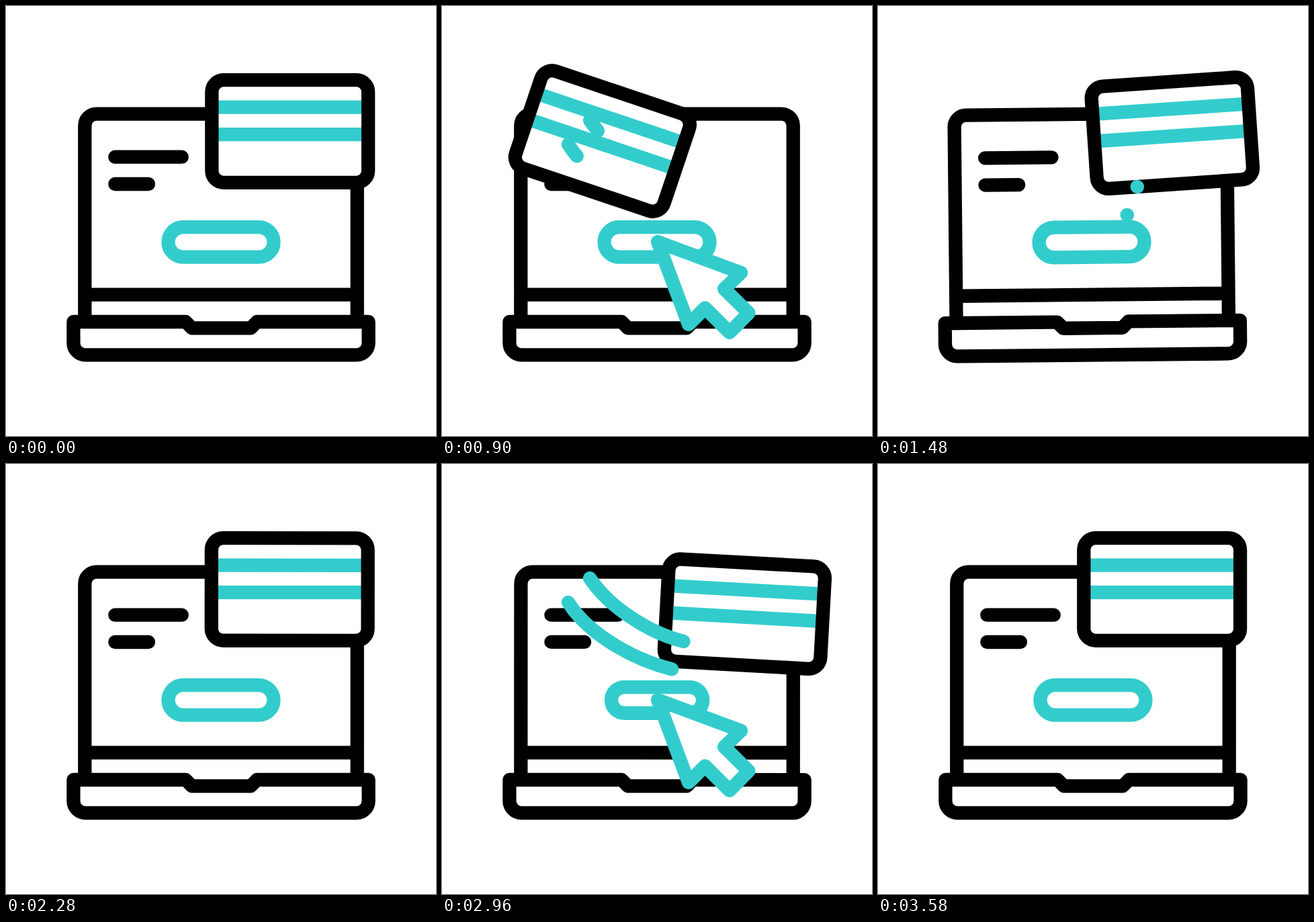
Write an HTML page that moves like this. It is 640 px wide and 640 px high and loops after 3600 ms.

```html
<!DOCTYPE html>
<html lang="en">
<head>
<meta charset="utf-8">
<title>Online payment</title>
<style>
  html, body { margin: 0; width: 100%; height: 100%; overflow: hidden; background: #fff; }
  svg { display: block; width: 100vw; height: 100vh; }
  svg * { stroke-linecap: round; stroke-linejoin: round; }
  .ink { fill: none; stroke: #000; stroke-width: 20.3; }
  .teal { fill: none; stroke: #33cccc; stroke-width: 20.3; }
  .paper { fill: #fff; }
  .stripe { stroke-linecap: butt; }
</style>
</head>
<body>
<svg viewBox="0 0 640 640">
  <g id="laptop">
    <path class="ink" d="M117.3 470V178a17.3 17.3 0 0 1 17.3-17.3H505.4a17.3 17.3 0 0 1 17.3 17.3V470M117.3 429.7H522.7"/>
    <path class="ink" d="M162.3 224.7H261.7M162.3 265H212"/>
    <path class="ink paper" d="M100.4 470H267.5L276.5 479.3H364.5L373.5 470H539.6V501.4a18 18 0 0 1-18 18H118.4a18 18 0 0 1-18-18Z"/>
    <g transform="translate(320 351.4)">
      <rect id="button" class="teal"/>
    </g>
  </g>
  <g id="card">
    <rect class="paper" x="-116" y="-76" width="232" height="152" rx="17"/>
    <path class="teal stripe" d="M-114-35.8H114M-114 4.6H114"/>
    <rect class="ink" x="-116.4" y="-76.3" width="232.8" height="152.6" rx="17.5"/>
  </g>
  <path class="teal trail" pathLength="100" d="M220 170C250 215 320 262 386 269"/>
  <path class="teal trail" pathLength="100" d="M188 206C215 250 290 300 371 311"/>
  <path id="cursor" class="teal paper" d="M321 351L445 397L420 421L456.500 457L428 486L391.500 449.500L367 474Z"/>
</svg>
<script>
const LOOP = 3600;
const $ = id => document.getElementById(id);
const trails = document.querySelectorAll('.trail');

// Progress from 0 to 1 between two times.
const span = (t, from, to) => Math.min(1, Math.max(0, (t - from) / (to - from)));

function ease(t, from, to, power = 2) {
  const u = span(t, from, to);
  return u < 0.5 ? (2 * u) ** power / 2 : 1 - (2 - 2 * u) ** power / 2;
}

// The card winds up, swings past its place until `hit`, then settles by `rest`.
const swing = (t, away, past, hit, rest) =>
  away * ease(t, 398, 775, 3)
  + (past - away) * ease(t, 861, hit)
  - past * ease(t, hit, rest);

// The blow of the card rocks the laptop once, fading out.
function rock(t) {
  const u = span(t, 1110, 1575);
  return 1.35 * Math.sin(2 * Math.PI * u) * Math.sqrt(1 - u);
}

function drawCard(t) {
  const x = 422.7 + swing(t, -192, 42, 1164, 1715);
  const y = 186.5 + swing(t, 13, 36.8, 1090, 1570);
  const turn = swing(t, 19, -5.9, 1297, 1740);
  $('card').setAttribute('transform', `translate(${x} ${y}) rotate(${turn})`);
  $('laptop').setAttribute('transform', `rotate(${rock(t)} 320 540)`);
}

function drawTrails(t) {
  const head = 100 * (1 - (1 - span(t, 885, 1350)) ** 3);
  const tail = 100 * ease(t, 1190, 1490);
  for (const trail of trails) {
    trail.style.display = head <= 0 || tail >= 100 ? 'none' : '';
    trail.setAttribute('stroke-dasharray', `${Math.max(head - tail, 0.1)} 300`);
    trail.setAttribute('stroke-dashoffset', -tail);
  }
}

function drawClick(t) {
  const away = 1.3 * (1 - ease(t, 60, 460) + ease(t, 914, 1314));
  $('cursor').setAttribute('transform', `translate(${171 * away} ${278 * away})`);

  const size = 1 - 0.133 * Math.sin(Math.PI * span(t, 680, 890));
  const width = 157 * size, height = 44.6 * size;
  const box = { x: -width / 2, y: -height / 2, width, height, rx: height / 2 };
  for (const name in box) $('button').setAttribute(name, box[name]);
}

// The scene plays twice per loop; the second click comes a little later.
function draw(t) {
  const again = t >= 2000;
  const cardTime = again ? t - 1850 : t;
  drawCard(cardTime);
  drawTrails(cardTime);
  drawClick(again ? t - 2170 : t);
}

const start = performance.now();
function tick() {
  draw((performance.now() - start) % LOOP);
  requestAnimationFrame(tick);
}
tick();
</script>
</body>
</html>
```
